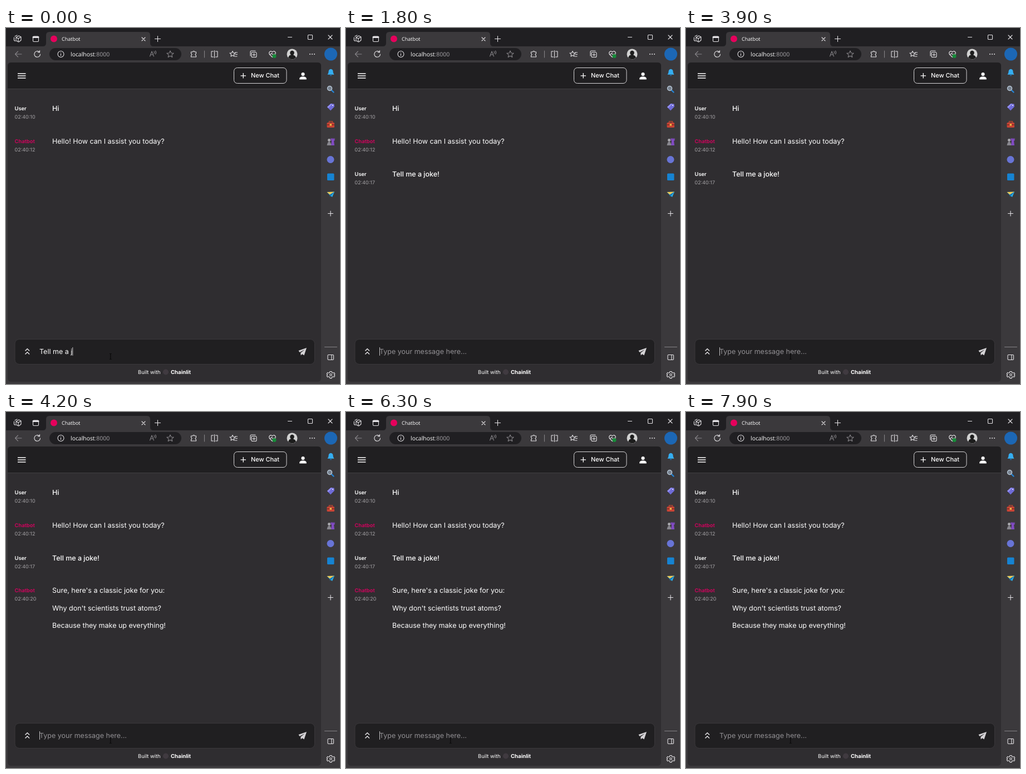
Write an HTML page that moves like this. It is 600 by 640 pixels and loops after 8000 ms.

```html
<!DOCTYPE html>
<html lang="en">
<head>
<meta charset="utf-8">
<title>Chatbot</title>
<style>
  html, body { margin: 0; width: 100%; height: 100%; overflow: hidden; background: #3b393c; }
  svg { display: block; width: 600px; height: 640px; }
  text { font: 12.5px Inter, sans-serif; fill: #fff; white-space: pre; text-rendering: geometricPrecision; }
  .chrome { font-family: "Open Sans", "Noto Sans", sans-serif; }
  .name { font-size: 9.4px; font-weight: 600; }
  .bot { fill: #d8005f; }
  .time { font-size: 9px; fill: #a5a3a6; }
  .said { font-weight: 500; }
  .small { font-size: 9.4px; }
  .line { fill: none; stroke: #e4e2e5; stroke-width: 1.1; stroke-linecap: round; stroke-linejoin: round; }
  .dim { stroke: #858387; }
  .hint { fill: #929094; }
</style>
</head>
<body>
<svg viewBox="0 0 600 640">
  <!-- window and tab strip -->
  <rect width="600" height="640" fill="#3b393c"/>
  <rect width="600" height="33" fill="#201f22"/>
  <path d="M66 33q6 0 6-6V13q0-6 6-6H253q6 0 6 6V27q0 6 6 6z" fill="#3b393c"/>
  <circle cx="86" cy="19.500" r="6" fill="#e6005c"/>
  <text class="chrome" x="100" y="23" style="font-size:9px">Chatbot</text>
  <g class="line">
    <path d="M18 17l5-3 4 2v6l-4 3-5-2zM18 17l4 2 5-3M22 19v6M16 15l4-2M14.500 17v5l2 1.500"/>
    <rect x="48.500" y="15" width="10" height="9.500" rx="1.500"/>
    <path d="M49 16.500h9" stroke-width="3"/>
    <path d="M244 17l6 6m0-6l-6 6M267.500 19.500h10M272.500 14.500v10"/>
    <path d="M506.500 16.500h7M579 13l7 7m0-7l-7 7"/>
    <rect x="542.500" y="12.500" width="8" height="8" rx="1"/>
  </g>

  <!-- toolbar -->
  <rect x="78" y="36" width="237" height="22" rx="11" fill="#201f22"/>
  <text class="chrome" x="116" y="50.800" style="font-size:10.4px">localhost<tspan fill="#a9a7ab">:8000</tspan></text>
  <g class="line">
    <path class="dim" d="M28 47H16.500m5-5l-5 5 5 5"/>
    <path d="M61.500 47a5.300 5.300 0 1 1-1.800-4M60.500 40.500v3.300h-3.300"/>
    <circle cx="98.500" cy="47" r="5.500"/>
    <path d="M98.500 46.500v3M98.500 44.300v.1"/>
    <path class="dim" d="M258.500 51l3.500-9 3.500 9M260 48h4M266 42q1.500 2 0 4M268.500 41q2 3 0 6"/>
    <path class="dim" d="M295 41l1.800 4 4.300.4-3.300 2.900 1 4.200-3.800-2.200-3.800 2.200 1-4.200-3.300-2.900 4.300-.4z"/>
    <path d="M332.500 43h3a1.800 1.800 0 0 1 3.500 0h2.500v3a1.800 1.800 0 0 0 0 3.500v2.500h-9v-2.500a1.800 1.800 0 0 0 0-3.500z"/>
    <path class="dim" d="M356.500 41v12"/>
    <path d="M372.500 42h-3.500v10h3.500M376.500 42h3.500v10h-3.500M374.500 40.500v13"/>
    <path d="M407 41.500l1.500 3.200 3.500.4-2.600 2.300.7 3.600-3.100-1.800-3 1.800.6-3.600-2.600-2.300 3.500-.4zM411.500 44h4M412 47.500h3.500M411.500 51h3.500"/>
    <rect x="441" y="43.500" width="9" height="9" rx="2"/>
    <path d="M439 50v-7q0-2 2-2h7M445.500 45.500v5M443 48h5"/>
    <path d="M478.500 52.500l-5-5q-2-3 .5-5t4.500.8q2-2.800 4.500-.8t.5 5zM473 47h3l1.500-2 2 4 1.500-2h3"/>
  </g>
  <circle cx="482" cy="50.500" r="3.500" fill="#168b38"/>
  <circle cx="514" cy="47" r="9.500" fill="#d2d2d2"/>
  <path d="M507 53.500q1-5 5-5-3-3-1-6.500 3-3 6 0 2 3-1 6.500 4 1 5 5-7 5.500-14 0z" fill="#1d1d1d"/>
  <g fill="#e4e2e5"><circle cx="546" cy="47" r="1"/><circle cx="550" cy="47" r="1"/><circle cx="554" cy="47" r="1"/></g>
  <circle cx="583.500" cy="47" r="11.500" fill="#1c67b5"/>

  <!-- sidebar -->
  <path d="M577.500 83.700q2-2 2-5.500 0-4 4-4.500 4 .5 4 4.500 0 3.500 2 5.500z" fill="#35aef2"/>
  <path d="M581.500 84.700h4q-2 3-4 0" fill="#1678c5"/>
  <path d="M584.500 111.500l4 4" stroke="#2586d8" stroke-width="2.400" stroke-linecap="round"/>
  <circle cx="581.500" cy="108.500" r="4" fill="#77818e" stroke="#b7c6d5" stroke-width="1.500"/>
  <path d="M577 142l6.500-6 6 .500.500 5-7 7z" fill="#6f6bd8"/>
  <path d="M577 142l6.500-6 3 .3-7.500 8z" fill="#938ff2"/>
  <circle cx="587" cy="139" r="1" fill="#fff"/>
  <path d="M580.500 170v-2h6v2" fill="none" stroke="#b84431" stroke-width="1.500"/>
  <rect x="576.500" y="170" width="13.500" height="9" rx="1.500" fill="#c74435"/>
  <path d="M576.500 174h13.500" stroke="#812a22" stroke-width="1.500"/>
  <rect x="581.500" y="172.500" width="3.500" height="3" fill="#f0c34a"/>
  <circle cx="580.500" cy="201.500" r="2.500" fill="#a8a7ad"/>
  <path d="M576.500 211q1-6 4-7 3 1 4 7z" fill="#88878e"/>
  <path d="M583.500 198h1.500v1.500h1.500V198h1.500v1.500h1.500V198h1v4l-1.500 1 1 8h-6l1-8-1.500-1z" fill="#814bc2"/>
  <circle cx="583" cy="236.500" r="6.500" fill="#6874d6"/>
  <rect x="577" y="261.500" width="12.500" height="12.500" rx="1.500" fill="#1683d2"/>
  <path d="M576.500 295l13.500-.5-4 9.500-4-3z" fill="#2caee5"/>
  <path d="M576.500 295l13.500-.5-8 5z" fill="#f3c950"/>
  <path d="M581.500 299.500l8.500-5-8 9z" fill="#1475b5"/>
  <g class="line">
    <path d="M578.500 333.500h9M583 329v9"/>
    <path class="dim" d="M572.500 573.500h22"/>
    <rect x="578" y="587.500" width="10.500" height="9" rx="1.500"/>
    <path d="M585 588v8"/>
    <circle cx="583.500" cy="623.500" r="1.800"/>
    <path d="M582 617.500h3l.6 2 2 .8 1.900-.7 1.300 2.400-1.500 1.500 1.500 1.600-1.300 2.400-1.900-.7-2 .8-.6 2h-3l-.6-2-2-.8-1.900.7-1.300-2.400 1.500-1.600-1.500-1.500 1.300-2.400 1.900.7 2-.8z"/>
  </g>

  <!-- page -->
  <rect x="3" y="62" width="563" height="574" rx="6" fill="#2f2d30"/>
  <path d="M3 109V68q0-6 6-6H560q6 0 6 6V109z" fill="#201f21"/>
  <path d="M3 109.500H566" stroke="#414042"/>
  <path d="M21 82h14.500M21 86h14.500M21 90h14.500" stroke="#fff" stroke-width="1.600"/>
  <rect x="409.500" y="71.500" width="94.500" height="28" rx="6" fill="none" stroke="#d5d4d6"/>
  <path d="M421.500 85.800h9.500M426.250 81v9.500" stroke="#fff" stroke-width="1.300"/>
  <text x="440" y="89.300" style="font-size:10.95px;font-weight:500">New Chat</text>
  <circle cx="533.500" cy="83" r="3.100" fill="#fff"/>
  <path d="M527.200 92.500v-1.700q.5-3.300 6.300-3.500 5.800.2 6.300 3.500v1.700z" fill="#fff"/>

  <g id="log"></g>

  <!-- composer -->
  <rect x="16" y="559.500" width="538.500" height="45" rx="8" fill="#201f21" stroke="#3a383b"/>
  <path d="M34.500 580.500l3.800-3.800 3.800 3.800M34.500 586.500l3.800-3.800 3.800 3.800" fill="none" stroke="#e4e2e5" stroke-width="1.500"/>
  <path d="M525.500 580l14.500-5-4.500 13.500-3.300-2.300-2.600 2.300-.3-4.500 7.500-6-9.300 5z" fill="#d5d3d6"/>
  <text id="field" x="60" y="586"></text>
  <rect id="caret" y="574" width="1" height="15" fill="#c4c2c5"/>
  <path d="M186 585.500h1.200l.6.600.600-.600h1.200M187.800 586v9M186 595.500h1.200l.6-.600.600.600h1.200" fill="none" stroke="#050505"/>
  <text class="small" x="237" y="621.800" fill="#d5d3d6">Built with</text>
  <circle cx="287" cy="618.500" r="5" fill="#403a40"/>
  <text x="296" y="621.800" style="font-size:9.6px;font-weight:700">Chainlit</text>
</svg>
<script>
  const LOOP = 8000, STEP = 100, BLINK = 530;
  const SENT = 700, REPLIED = 4100;
  const draft = "Tell me a joke!";
  const keyTimes = [100, 200, 300, 500];

  const messages = [
    { who: "User", time: "02:40:10", y: 149, lines: ["Hi"], at: 0 },
    { who: "Chatbot", time: "02:40:12", y: 208, lines: ["Hello! How can I assist you today?"], at: 0 },
    { who: "User", time: "02:40:17", y: 267, lines: [draft], at: SENT },
    { who: "Chatbot", time: "02:40:20", y: 325.2, at: REPLIED, lines: [
      "Sure, here's a classic joke for you:",
      "Why don't scientists trust atoms?",
      "Because they make up everything!"] }
  ];

  const log = document.getElementById("log");
  const field = document.getElementById("field");
  const caret = document.getElementById("caret");

  function add(parent, tag, attrs, content = "") {
    const node = document.createElementNS("http://www.w3.org/2000/svg", tag);
    for (const key in attrs) node.setAttribute(key, attrs[key]);
    node.textContent = content;
    return parent.appendChild(node);
  }

  for (const m of messages) {
    const isUser = m.who === "User";
    m.node = add(log, "g", {});
    add(m.node, "text", { x: 15.5, y: m.y - 1, class: isUser ? "name" : "name bot" }, m.who);
    add(m.node, "text", { x: 15.5, y: m.y + 14.2, class: "time" }, m.time);
    m.lines.forEach((line, i) =>
      add(m.node, "text", { x: 83, y: m.y + i * 31.4, class: isUser ? "said" : "" }, line));
  }

  function caretShown(t) {
    if (t < SENT) return true;
    const since = t - (t < REPLIED ? SENT : REPLIED);
    return since % (2 * BLINK) < BLINK;
  }

  function render(t) {
    const typing = t < SENT;
    const typed = draft.length - keyTimes.filter(k => k > t).length;
    field.textContent = typing ? draft.slice(0, typed) : "Type your message here...";
    field.setAttribute("class", typing ? "" : "hint");
    caret.setAttribute("x", 60 + (typing ? field.getComputedTextLength() : 0));
    caret.style.visibility = caretShown(t) ? "visible" : "hidden";
    for (const m of messages) m.node.style.display = t >= m.at ? "" : "none";
  }

  const start = performance.now();
  function tick() {
    const t = (performance.now() - start) % LOOP;
    render(Math.floor(t / STEP) * STEP);
    requestAnimationFrame(tick);
  }
  tick();
</script>
</body>
</html>
```
